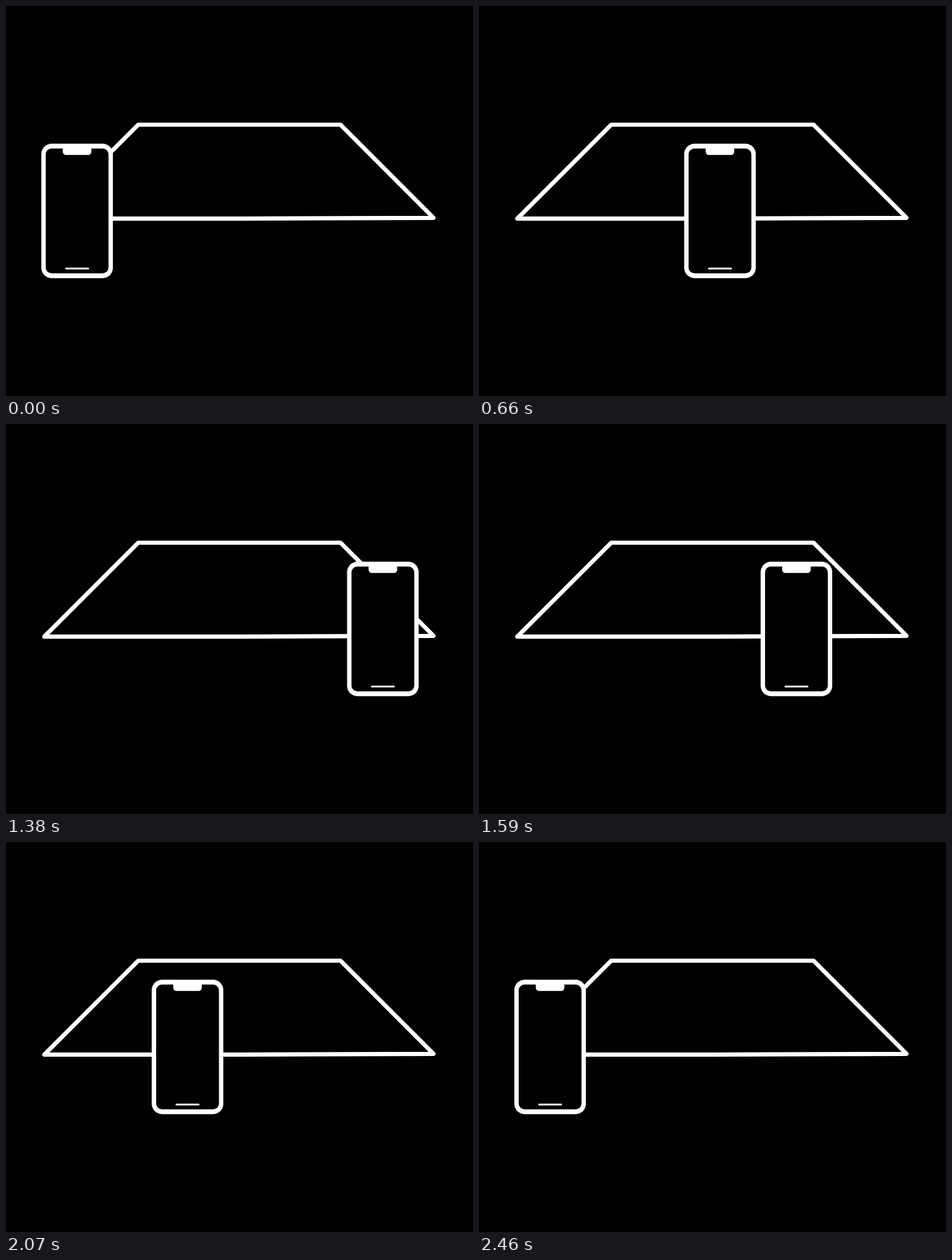
Write an HTML page that moves like this. It is 800 by 667 pixels and loops after 2520 ms.

```html
<!DOCTYPE html>
<html lang="en">
<head>
<meta charset="utf-8">
<title>Sliding phone</title>
<style>
  html, body {
    margin: 0;
    width: 100%;
    height: 100%;
    overflow: hidden;
    background: #000;
  }
  svg {
    display: block;
    width: 100%;
    height: 100%;
  }
  .table {
    fill: none;
    stroke: #fff;
    stroke-width: 7.2;
    stroke-linejoin: round;
  }
  .phone {
    fill: #fff;
    animation: slide 2520ms -1ms infinite;
  }
  .screen { fill: #000; }

  /* rest 60 ms, 38 ticks of 30 ms across, rest 120 ms, 38 ticks back, rest 60 ms */
  @keyframes slide {
    0% { transform: translateX(0); animation-timing-function: linear; }
    2.38095% { transform: translateX(0); animation-timing-function: steps(38, end); }
    47.61905% { transform: translateX(552.9px); animation-timing-function: linear; }
    52.38095% { transform: translateX(552.9px); animation-timing-function: steps(38, end); }
    97.61905%, 100% { transform: translateX(0); }
  }
</style>
</head>
<body>
<svg viewBox="0 0 800 667">
  <path class="table" d="M226.5 203H573L732.3 362.3L400 363.6H65.6Z"/>
  <g class="phone">
    <rect x="60.5" y="235.6" width="122.6" height="229.8" rx="17.5"/>
    <rect class="screen" x="68" y="243.8" width="107.6" height="213.4" rx="10"/>
    <path d="M97.3 242H146.3V249.3a5.5 5.5 0 0 1-5.5 5.5H102.8a5.5 5.5 0 0 1-5.5-5.5Z"/>
    <rect x="101.3" y="447.4" width="41" height="3" rx="1.5"/>
  </g>
</svg>
</body>
</html>
```
